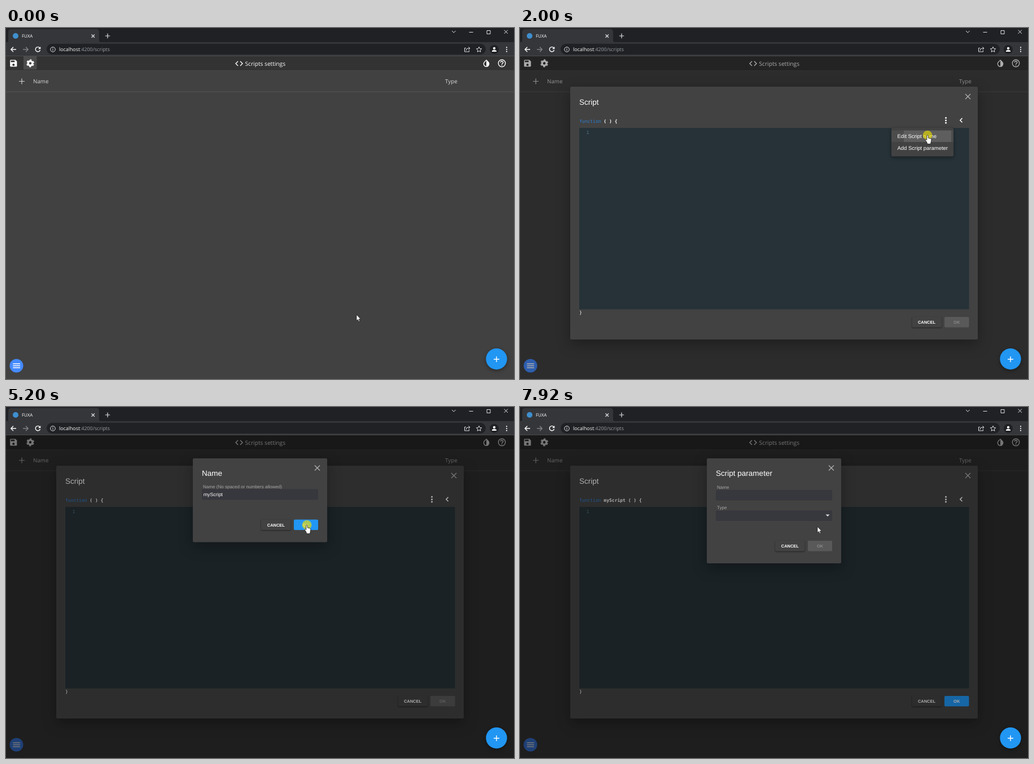
An HTML page that plays this animation: 900 by 622 pixels, repeating every 8 s.

```html
<!DOCTYPE html>
<html lang="en">
<head>
<meta charset="utf-8">
<title>Scripts settings</title>
<style>
html, body { margin: 0; width: 100%; height: 100%; overflow: hidden; background: #202124; }
svg { display: block; width: 900px; height: 622px; text-rendering: geometricPrecision; cursor: default; }
text { fill: #fff; white-space: pre; font-family: "Liberation Sans", Arial, sans-serif; }
.ui { font-family: "Open Sans", "Noto Sans", sans-serif; }
.code { font: 8px "DejaVu Sans Mono", monospace; }
.title { font-size: 13.52px; }
.label { font-size: 8.05px; fill: #a8a8a8; }
.item { font-size: 9.47px; }
.btn { font-size: 7.44px; font-weight: bold; text-anchor: middle; }
.line { fill: none; stroke: #fff; stroke-width: 1.4; }
.thin { fill: none; stroke: #dfe1e5; stroke-width: 1; }
.cross { fill: none; stroke: #b4b4b4; stroke-width: 1.2; }
.card { fill: #424242; filter: drop-shadow(0 8px 12px rgba(0,0,0,.32)); }
.raised { fill: #424242; filter: drop-shadow(0 1px 1px rgba(0,0,0,.5)); }
.field { fill: #37373e; }
.scale { transform-box: fill-box; transform-origin: center; }
</style>
</head>
<body>
<svg viewBox="0 0 900 622">
  <!-- browser frame -->
  <rect width="900" height="50" fill="#202124"/>
  <path d="M0 25h2q2 0 2-3V7q0-5 5-5H160q5 0 5 5v15q0 3 2 3H900v25H0z" fill="#35363a"/>
  <circle cx="17" cy="14" r="5" fill="#3f8fce"/>
  <text class="ui" x="28" y="17" font-size="7.9">FUXA</text>
  <path class="thin" style="stroke-width:1.2" d="M151.5 11.5l5.5 5.5m0-5.5l-5.5 5.5M180 9.8v8.4m-4.2-4.2h8.4"/>
  <path class="thin" d="M790 5l3.300 3.300L796.600 5M820.500 7.500h7M852 4.500h6v6h-6zM882.500 3.500l6.500 6.500m0-6.500l-6.500 6.500"/>
  <rect x="72" y="28" width="778" height="19" rx="9.500" fill="#202124"/>
  <path class="line" d="M18 38H9m4-4.200L8.800 38l4.200 4.200"/>
  <path class="line" style="stroke:#808286" d="M30 38h9m-4-4.200l4.200 4.200-4.200 4.200"/>
  <path class="line" d="M59.800 35.200A4.200 4.200 0 1 0 60.500 39"/>
  <path d="M61.300 33v4.300H57z" fill="#fff"/>
  <circle class="thin" cx="83" cy="38" r="4.300"/>
  <path class="thin" d="M83 37.300v3M83 35.200v1.200"/>
  <text class="ui" x="94" y="41" font-size="8.85">localhost<tspan fill="#9aa0a6">:4200/scripts</tspan></text>
  <path class="thin" d="M815 35.500h-2.500v6.500h8v-2.500M815 40q0-4 4-4h2.500m-2-2.500l2.500 2.500-2.500 2.500"/>
  <path class="thin" d="M838 33.500l1.400 3 3.300.4-2.500 2.200.7 3.300-2.900-1.700-2.900 1.700.7-3.300-2.500-2.200 3.300-.4z"/>
  <circle cx="865" cy="38" r="8" fill="#202124"/>
  <path d="M861 42v-1q0-2 4-2t4 2v1z" fill="#fff"/>
  <circle cx="865" cy="36" r="2.200" fill="#fff"/>
  <g fill="#fff"><circle cx="887" cy="34.300" r="1.100"/><circle cx="887" cy="38" r="1.100"/><circle cx="887" cy="41.700" r="1.100"/></g>

  <!-- page -->
  <rect y="50" width="900" height="572" fill="#414141"/>
  <rect y="50" width="900" height="25" fill="#333"/>
  <rect y="49" width="900" height="1" fill="#4b4c4f"/>
  <rect y="75" width="900" height="1" fill="#484848"/>
  <rect y="112.500" width="900" height="1" fill="#565656"/>
  <rect id="gearBg" x="31" y="50" width="23.500" height="23.500" fill="#4b4b4b"/>
  <path transform="translate(5.200 54.400) scale(.676)" fill="#fff" fill-rule="evenodd" d="M17 3H5c-1.110 0-2 .9-2 2v14c0 1.100.89 2 2 2h14c1.100 0 2-.9 2-2V7l-4-4zm-5 16c-1.660 0-3-1.340-3-3s1.340-3 3-3 3 1.340 3 3-1.340 3-3 3zm3-10H5V5h10v4z"/>
  <g transform="translate(43 62.500) rotate(14.700)" fill="none" stroke="#fff">
    <circle r="3.900" stroke-width="3.200"/>
    <circle r="6" stroke-width="1.800" stroke-dasharray="3.200 3.083"/>
  </g>
  <path class="line" d="M411 59l-4 4 4 4M415 59l4 4-4 4"/>
  <text class="ui" x="423.500" y="66.500" font-size="10.200">Scripts settings</text>
  <path transform="translate(842.900 54.400) scale(.676)" fill="#fff" fill-rule="evenodd" d="M17.660 7.930L12 2.270 6.340 7.930c-3.120 3.120-3.120 8.190 0 11.310 3.120 3.120 8.200 3.120 11.320 0 3.120-3.120 3.120-8.190 0-11.310zM12 19.590c-3.310 0-6-2.680-6-6 0-1.600.62-3.110 1.760-4.240L12 5.100z"/>
  <circle class="line" cx="878.500" cy="62.500" r="6.200"/>
  <path class="line" d="M876.300 61.300q0-2.300 2.200-2.300t2.200 2q0 1.200-1.300 1.900-.9.500-.9 1.600M878.500 65.300v1.500"/>
  <path class="line" style="stroke:#d0d0d0;stroke-width:1.200" d="M28 89.500v10m-5-5h10"/>
  <g fill-opacity=".8"><text class="ui" x="48" y="98" font-size="9.800">Name</text>
  <text class="ui" x="778" y="98" font-size="9.800">Type</text></g>
  <circle cx="18.500" cy="598.500" r="12" fill="#448aff"/>
  <path class="line" d="M12.300 595h12.700M12.300 598.500h12.700M12.300 602h12.700"/>

  <rect id="dim1" y="50" width="900" height="572"/>

  <!-- script dialog -->
  <g id="script" class="scale">
    <rect class="card" x="89" y="104" width="722" height="448" rx="2"/>
    <text class="title" x="105" y="135.500">Script</text>
    <path class="cross" d="M789 117l9 9m0-9l-9 9"/>
    <text class="code" x="105" y="168"><tspan fill="#2b7fd3">function</tspan> <tspan id="signature" font-weight="bold"></tspan></text>
    <circle id="halo" cx="754.500" cy="163.500" r="13" fill="#fff" fill-opacity=".06"/>
    <g fill="#fff"><circle cx="754.500" cy="159.300" r="1.500"/><circle cx="754.500" cy="163.700" r="1.500"/><circle cx="754.500" cy="168.100" r="1.500"/></g>
    <path class="line" style="stroke-width:1.600" d="M783.500 159.800l-3.700 3.700 3.700 3.700"/>
    <rect x="105" y="177" width="690.500" height="321.500" fill="#263238"/>
    <text class="code" x="117.500" y="187.500" style="fill:#54717f">1</text>
    <text class="code" x="105" y="507" font-weight="bold">}</text>
    <rect class="raised" x="694.500" y="512" width="52.500" height="18.500" rx="2"/>
    <text class="btn" x="720.500" y="524">CANCEL</text>
    <rect id="okBox" x="752" y="512" width="43.500" height="18.500" rx="2"/>
    <text id="okText" class="btn" x="773.700" y="524">OK</text>
  </g>

  <g id="menu" class="scale" style="transform-origin:100% 0">
    <rect class="card" x="658" y="177" width="110" height="50.500" rx="2" style="filter:drop-shadow(0 2px 3px rgba(0,0,0,.4))"/>
    <rect id="hover" x="658" width="110" height="20.500" fill="#fff" fill-opacity=".05"/>
    <rect id="ripple" height="20.500" fill="#fff" fill-opacity=".1"/>
    <text class="item" x="668.500" y="195">Edit Script name</text>
    <text class="item" x="668.500" y="215.500">Add Script parameter</text>
  </g>

  <rect id="dim2" y="50" width="900" height="572"/>

  <!-- name dialog -->
  <g id="name" class="scale">
    <rect class="card" x="331" y="91" width="238" height="148.500" rx="2"/>
    <text class="title" x="347" y="122">Name</text>
    <path class="cross" d="M547 103.500l9 9m0-9l-9 9"/>
    <text class="label" x="349" y="143.700">Name (No spaced or numbers allowed)</text>
    <rect id="input" class="field" x="347.500" y="146" width="205" height="18" rx="1" stroke-width="1"/>
    <text id="typed" x="349.800" y="157.700" font-size="8.790"></text>
    <rect id="caret" y="150" width="1" height="10" fill="#fff"/>
    <rect class="raised" x="452" y="199.500" width="52.500" height="18.500" rx="2"/>
    <text class="btn" x="478.300" y="211.500">CANCEL</text>
    <rect x="510" y="199.500" width="43" height="18.500" rx="2" fill="#2196f3"/>
    <circle id="press" cx="533" cy="209" r="9" fill="#fff" fill-opacity=".1"/>
    <text class="btn" x="531.500" y="211.500">OK</text>
  </g>

  <!-- parameter dialog -->
  <g id="param" class="scale">
    <rect class="card" x="331" y="91" width="238" height="186" rx="2"/>
    <text class="title" x="347" y="122">Script parameter</text>
    <path class="cross" d="M547 103.500l9 9m0-9l-9 9"/>
    <text class="label" x="349" y="145">Name</text>
    <rect class="field" x="347" y="147" width="206" height="18.500" rx="1"/>
    <text class="label" x="349" y="181.300">Type</text>
    <rect class="field" x="347" y="183.500" width="206" height="18.500" rx="1"/>
    <path d="M541.500 190.500h7l-3.500 3.500z" fill="#ddd"/>
    <rect class="raised" x="452" y="237" width="52.500" height="18.500" rx="2"/>
    <text class="btn" x="478.300" y="249">CANCEL</text>
    <rect x="510" y="237" width="43" height="18.500" rx="2" fill="#595959"/>
    <text class="btn" x="531.500" y="249" style="fill:#898989">OK</text>
  </g>

  <!-- floating button -->
  <circle cx="869" cy="586.500" r="18.700" fill="#2196f3" style="filter:drop-shadow(0 2px 3px rgba(0,0,0,.4))"/>
  <circle id="fabGlow" cx="869" cy="586.500" r="18.700" fill="#fff"/>
  <path class="line" d="M869 582v10m-5-5h10"/>

  <circle id="mark" r="8.300" fill="#e6dc00" fill-opacity=".65"/>
  <g id="cursor" stroke-linejoin="round">
    <path id="arrow" d="M0 0v10.700l2.400-2.200 1.700 3.800 1.700-.7-1.700-3.700h3.300z" fill="#fff" stroke="#000" stroke-width=".6"/>
    <path id="hand" d="M-1.200.5Q0-.8 1.200.5V5l4.500 1q1.300.4 1.200 2l-.7 4-.8 3.500H-.2L-1.500 12-3.800 8.800q-.2-1.600 1.200-1.400L-1.200 8.500z" fill="#fff" stroke="#000" stroke-width=".7"/>
    <path id="beam" d="M-2-5h1.500L0-4.500.5-5H2M0-4.500v9M-2 5h1.500L0 4.500.5 5H2" fill="none" stroke="#e8e8e8" stroke-width=".9"/>
  </g>
</svg>
<script>
const el = {};
document.querySelectorAll('[id]').forEach(e => el[e.id] = e);

const LOOP = 8000, STEP = 80;
// pointer moves: start, end, x, y
const moves = [
  [0, 400, 868, 587], [720, 1360, 755, 165], [1520, 1840, 722, 190],
  [2080, 2480, 541, 205], [2560, 2720, 517, 159], [4640, 5120, 533, 209],
  [5280, 5440, 536, 211], [5520, 5840, 755, 165], [6160, 6480, 710, 209],
  [6720, 7040, 706, 210], [7120, 7920, 527, 212]
];
const clicks = [560, 1440, 2000, 2720, 5200, 5920, 6720];
const keys = [3360, 3520, 3680, 3760, 3920, 4000, 4240, 4400];

const part = (t, from, len) => Math.min(1, Math.max(0, (t - from) / len));
const out = p => 1 - (1 - p) ** 3;
const smooth = p => p * p * (3 - 2 * p);
const show = (e, on) => e.style.display = on ? '' : 'none';
const within = (x, y, l, t, r, b) => x >= l && x <= r && y >= t && y <= b;

function pointer(t) {
  let x = 621, y = 508;
  for (const [from, to, tx, ty] of moves) {
    const p = smooth(part(t, from, to - from));
    x += (tx - x) * p;
    y += (ty - y) * p;
  }
  return [x, y];
}

function pop(e, t, from, to, len, small) {
  const p = out(part(t, from, len));
  show(e, t > from && t < to);
  e.style.opacity = p;
  e.style.transform = `scale(${small + (1 - small) * p})`;
}

function pointerShape(t, x, y) {
  const upper = t > 2040 && t < 5280 || t > 6740;
  const menu = t > 1440 && t < 2080 || t > 5930 && t < 6800;
  if (Math.hypot(x - 869, y - 586.5) < 19) return 'hand';
  if (upper) {
    if (t > 6740) return 'arrow';
    if (within(x, y, 347, 146, 553, 164)) return 'beam';
    return within(x, y, 510, 199, 553, 218) ? 'hand' : 'arrow';
  }
  if (t < 500) return 'arrow';
  if (Math.hypot(x - 754.5, y - 163.5) < 13) return 'hand';
  if (menu && within(x, y, 658, 177, 768, 227)) return 'hand';
  return within(x, y, 105, 177, 795, 498) ? 'beam' : 'arrow';
}

function draw(t) {
  const [x, y] = pointer(t);
  const named = t >= 5280;

  show(el.gearBg, t < 560);
  el.dim1.setAttribute('opacity', .32 * out(part(t, 490, 400)));
  el.dim2.setAttribute('opacity', .32 * (
    out(part(t, 2040, 400)) - out(part(t, 5210, 400)) + out(part(t, 6720, 360))));
  pop(el.script, t, 490, LOOP, 150, .7);
  pop(el.name, t, 2040, 5280, 150, .7);
  pop(el.param, t, 6720, LOOP, 150, .7);
  if (t < 4000) pop(el.menu, t, 1440, 2080, 120, .8);
  else pop(el.menu, t, 5930, 6800, 120, .8);

  el.signature.textContent = named ? 'myScript ( ) {' : '( ) {';
  el.okBox.setAttribute('fill', named ? '#2196f3' : '#595959');
  el.okText.style.fill = named ? '#fff' : '#898989';
  show(el.halo, t >= 560 && t < 1520 || t >= 5760 && t < 6240);

  show(el.hover, within(x, y, 658, 182, 768, 223));
  el.hover.setAttribute('y', y < 202 ? 181.5 : 202);
  show(el.ripple, t === 2000 || t === 6720);
  const r = t < 4000 ? 42 : 37;
  el.ripple.setAttribute('x', x - r);
  el.ripple.setAttribute('width', 2 * r);
  el.ripple.setAttribute('y', y < 202 ? 181.5 : 202);

  const focused = t >= 2720 && t < 5200;
  const count = keys.filter(k => k <= t).length;
  el.typed.textContent = 'myScript'.slice(0, count);
  el.input.setAttribute('stroke', focused ? '#1f80cc' : '#37373e');
  show(el.caret, focused && t < 4560);
  if (focused) el.caret.setAttribute('x', Math.floor(349.8 + el.typed.getComputedTextLength()));
  show(el.press, t === 5200);

  const overFab = Math.hypot(x - 869, y - 586.5) < 19;
  el.fabGlow.setAttribute('opacity', !overFab ? 0 : t < 560 ? .05 : .1);

  show(el.mark, clicks.includes(t));
  el.mark.setAttribute('transform', `translate(${x} ${y})`);
  el.cursor.setAttribute('transform', `translate(${x} ${y})`);
  const shape = pointerShape(t, x, y);
  for (const s of ['arrow', 'hand', 'beam']) show(el[s], s === shape);
}

function tick() {
  draw(Math.floor(performance.now() % LOOP / STEP) * STEP);
  requestAnimationFrame(tick);
}
tick();
</script>
</body>
</html>
```
